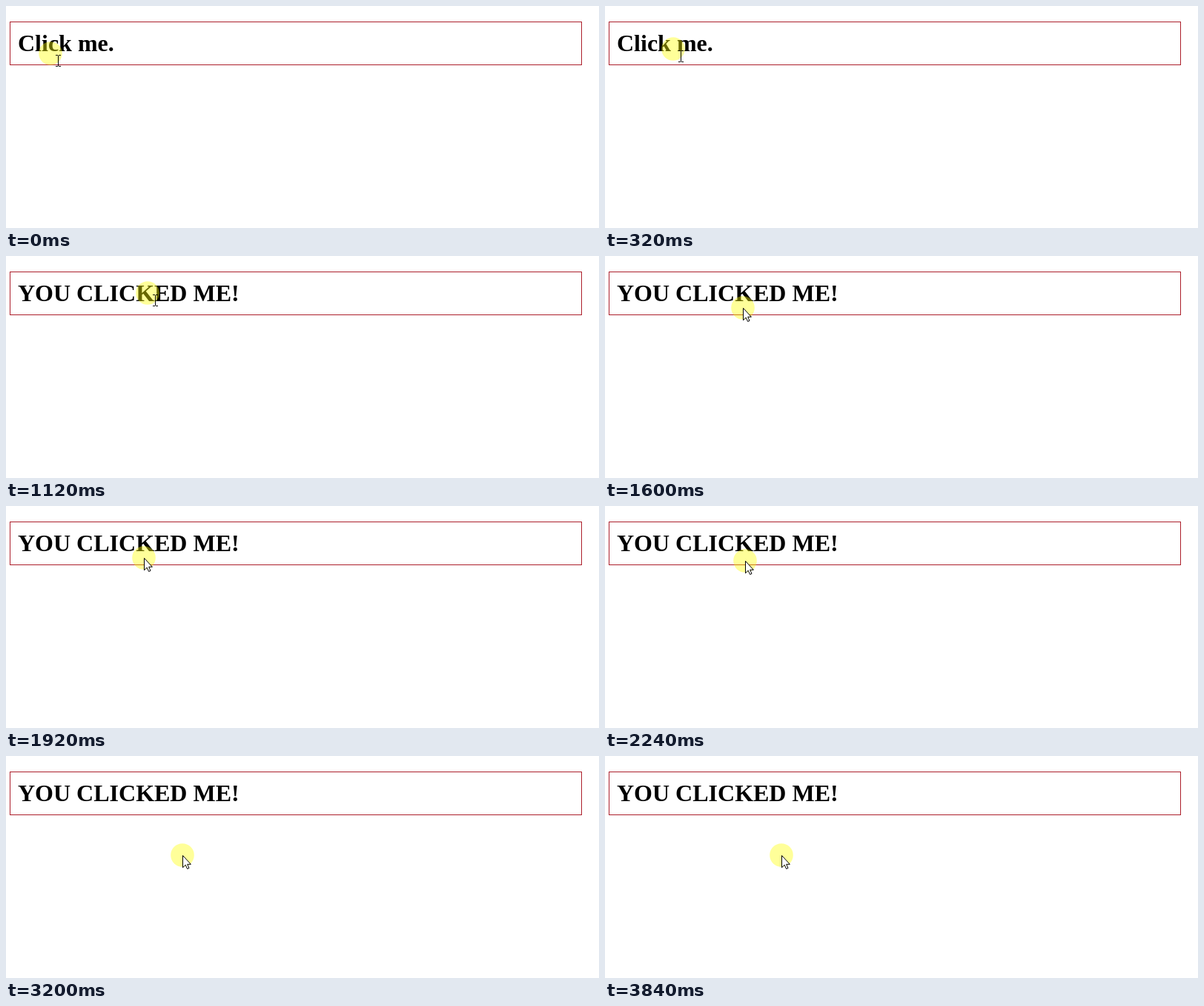
These frames come from a looping animation (800x300 px, 4 s). An HTML page:

```html
<!DOCTYPE html>
<html lang="en">
<head>
<meta charset="utf-8">
<title>Click me</title>
<style>
  html, body { margin: 0; width: 100%; height: 100%; overflow: hidden; background: #fff; }
  svg { display: block; width: 800px; height: 300px; }
  text { font: bold 32px "Liberation Serif", "Times New Roman", serif; font-kerning: none; }
</style>
</head>
<body>
<svg viewBox="0 0 800 300">
  <rect x="5.5" y="21.5" width="771" height="58" fill="none" stroke="#ac1f2b"/>
  <text id="label" x="16" y="61">Click me.</text>
  <g id="pointer">
    <circle r="15.8" fill="#ff0" fill-opacity=".4"/>
    <path id="arrow" fill="#fff" stroke="#000" stroke-linejoin="round"
      d="M.5 .5V16.8L4.2 13.2L6.6 18.5L9 17.5L6.7 12.3H11.4Z"/>
    <path id="beam" fill="none" stroke="#000"
      d="M7 2.5h3m1 0h3M10.5 3v14M7 17.5h3m1 0h3"/>
  </g>
</svg>
<script>
const LOOP = 4000;
const CLICK = 1120;

// [start ms, x, y, cursor]
const STEPS = [
  [0, 60, 64, "beam"],
  [160, 68, 58, "beam"],
  [320, 92, 58, "beam"],
  [480, 138, 56, "beam"],
  [640, 191, 50, "arrow"],
  [CLICK, 191, 50, "beam"],
  [1440, 189, 64, "beam"],
  [1600, 186, 70, "arrow"],
  [2240, 189, 74, "arrow"],
  [2400, 232, 131, "arrow"],
  [2560, 237, 133, "arrow"],
  [2880, 238, 134, "arrow"]
];

const byId = id => document.getElementById(id);
const label = byId("label");
const pointer = byId("pointer");
const cursors = ["arrow", "beam"].map(byId);

function draw(time) {
  const t = time % LOOP;
  const [, x, y, kind] = STEPS.filter(step => step[0] <= t).pop();
  pointer.setAttribute("transform", `translate(${x} ${y})`);
  for (const c of cursors) c.style.display = c.id === kind ? "" : "none";
  label.textContent = t < CLICK ? "Click me." : "YOU CLICKED ME!";
}

const start = performance.now();
function tick() {
  draw(performance.now() - start);
  requestAnimationFrame(tick);
}
tick();
</script>
</body>
</html>
```
